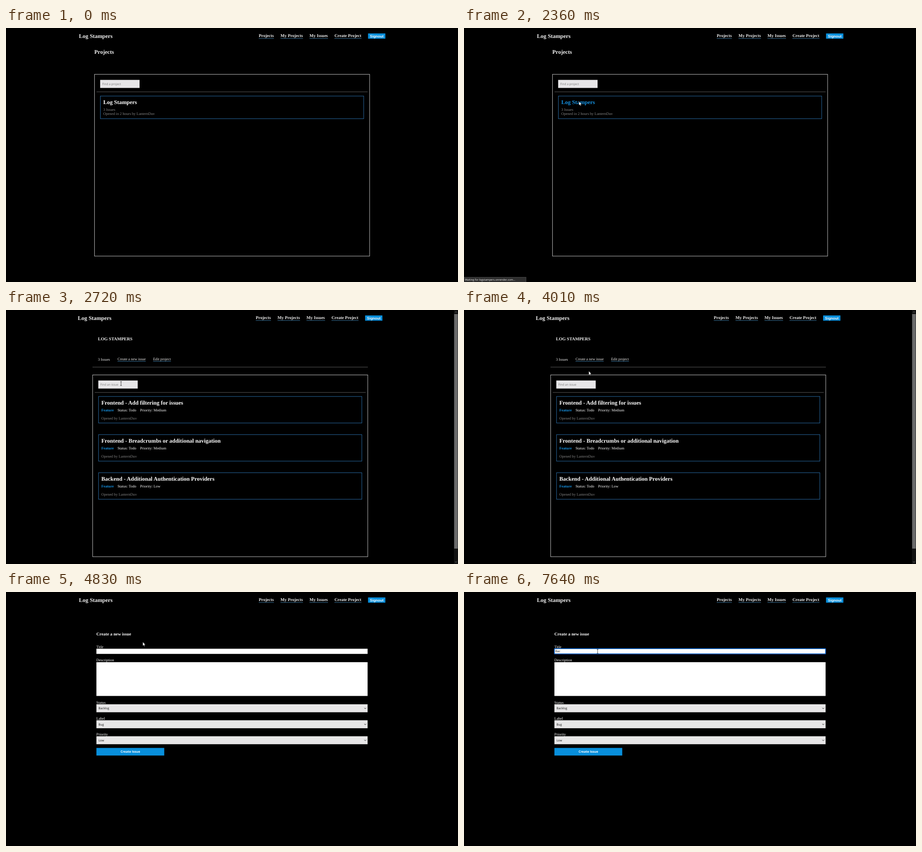
An HTML page for the animation above (8 s loop, 998 px wide and 561 px high).

```html
<!DOCTYPE html>
<html lang="en">
<head>
<meta charset="utf-8">
<title>Issue tracker walkthrough</title>
<style>
  html, body { margin: 0; width: 100%; height: 100%; overflow: hidden; background: #000; }
  svg { display: block; width: 998px; height: 561px; }
  text { font: 8.32px "Liberation Serif", serif; fill: #fff; white-space: pre; text-rendering: geometricPrecision; }
  .h1 { font-size: 12.48px; font-weight: bold; }
  .h2 { font-size: 9.73px; font-weight: bold; }
  .nav { font-size: 9.56px; font-weight: bold; }
  .soft { fill: #f0f0f0; }
  .gray { fill: #858585; }
  .label { fill: #1590df; font-weight: bold; }
  .ui { font: 6.55px "Open Sans", sans-serif; fill: #111; }
  .hint { fill: #777; }
  .signout { font: bold 8.1px "Liberation Sans", sans-serif; }
  .submit { font: bold 7.05px "Open Sans", sans-serif; text-anchor: middle; }
  .status { font: 5.9px "Open Sans", sans-serif; fill: #f4f4f4; }
  .box { fill: none; stroke: #c4c4c4; }
  .card { fill: none; stroke: #2a6ca6; }
  .chevron { fill: none; stroke: #222; }
</style>
</head>
<body>
<svg id="stage" viewBox="0 0 998 561"></svg>
<script>
const LOOP = 8000, STEP = 90;
const TEAM = "Log Stampers", AUTHOR = "LanternDuv", HOST = "logstampers.onrender.com";
const BLUE = "#088fdc", LINK = "#3d779f";

const text = (x, y, str, cls = "", id = "") =>
  `<text x="${x}" y="${y}" class="${cls}" id="${id}">${str}</text>`;
const fill = (x, y, w, h, color, extra = "") =>
  `<rect x="${x}" y="${y}" width="${w}" height="${h}" fill="${color}" ${extra}/>`;
const frame = (x, y, w, h, cls) =>
  `<rect x="${x}" y="${y}" width="${w}" height="${h}" class="${cls}"/>`;
const rule = (x, y, w, color = "#5c5c5c", id = "") => fill(x, y, w, 1, color, `id="${id}"`);

function header(left, right) {
  const links = [["Projects", 558, 33.5], ["My Projects", 606, 49.7],
    ["My Issues", 670, 41], ["Create Project", 725.2, 59.7]];
  return text(161 + left, 22, TEAM, "h1 soft") +
    links.map(([name, x, w]) =>
      text(x + right, 20.4, name, "nav soft") + rule(x + right, 22.6, w, LINK)).join("") +
    fill(799.4 + right, 12, 38.2, 11.6, BLUE) + text(803.5 + right, 20.8, "Signout", "signout");
}

function searchBox(x, y, hint) {
  return frame(x, y, 607.5, 401.5, "box") +
    fill(x + 12.5, y + 12.3, 87, 17.8, "#e7e6e8") +
    text(x + 17, y + 24, hint, "ui hint") + rule(x + 4.5, y + 38.2, 598.5);
}

function projectsPage() {
  return header(0, 0) + text(195, 57, "Projects", "h1 soft") +
    searchBox(195.4, 102.3, "Find a project") +
    frame(208.4, 150.3, 581.4, 50, "card") +
    text(214.7, 168, TEAM, "h1", "project") +
    text(214.7, 182.6, "3 Issues", "gray") +
    text(214.7, 191.8, `Opened in 2 hours by ${AUTHOR}`, "gray");
}

function issueCard(title, priority, i) {
  const y = 191 + i * 84.2;
  return frame(204.3, y, 581.4, 58.6, "card") +
    text(210.4, y + 18, title, "h1") +
    text(210.4, y + 33, "Feature", "label") +
    text(246.2, y + 33, "Status: Todo") +
    text(296, y + 33, `Priority: ${priority}`) +
    text(210.4, y + 50.8, `Opened by ${AUTHOR}`, "gray");
}

function issuesPage() {
  const issues = [["Frontend - Add filtering for issues", "Medium"],
    ["Frontend - Breadcrumbs or additional navigation", "Medium"],
    ["Backend - Additional Authentication Providers", "Low"]];
  return header(-2.5, -6.5) +
    text(203, 66.6, TEAM.toUpperCase(), "h2 soft") +
    text(203, 112, "3 Issues", "soft") +
    text(246.3, 111.3, "Create a new issue", "soft") + rule(246.3, 112.8, 62.2, LINK, "createLine") +
    text(324.8, 111.3, "Edit project", "soft") + rule(324.8, 112.8, 39.4, LINK) +
    rule(191, 125.6, 608) + searchBox(191.3, 143.4, "Find an issue") +
    issues.map(([title, priority], i) => issueCard(title, priority, i)).join("") +
    fill(989, 0, 9, 561, "#121212") + fill(989.5, 9, 8, 518, "#6a6a6a") +
    `<path d="M991.5 5.5l2-2 2 2M991.5 555.5l2 2 2-2" fill="none" stroke="#777"/>`;
}

function select(name, value, i) {
  const y = 248 + i * 35.3;
  return text(199.6, y - 1.4, name) + fill(199.6, y, 598.8, 17.6, "#e7e6e7") +
    text(204.2, y + 11.2, value, "ui") +
    `<path class="chevron" d="M791 ${y + 7.8}l2.2 2.2 2.2-2.2"/>`;
}

function formPage() {
  return header(0, 0) + text(199.6, 95.6, "Create a new issue", "h2") +
    text(199.6, 123.8, "Title") + fill(199.6, 125.3, 598.8, 11.4, "#fff") +
    `<rect id="focus" x="199.6" y="125.1" width="598.8" height="11.6" rx=".8" fill="none" stroke="#0a5fc4" stroke-width="1.8"/>` +
    text(201.7, 133.4, "", "ui", "typed") + fill(0, 127, 0.8, 8, "#111", `id="caret"`) +
    text(199.6, 153, "Description") + fill(199.6, 155, 598.8, 74.6, "#fff") +
    select("Status", "Backlog", 0) + select("Label", "Bug", 1) + select("Priority", "Low", 2) +
    fill(199.6, 344.4, 149.8, 16.8, BLUE) + text(274.5, 355.4, "Create Issue", "submit");
}

document.getElementById("stage").innerHTML = fill(0, 0, 998, 561, "#000") +
  [projectsPage, issuesPage, formPage].map((page, i) => `<g id="page${i}">${page()}</g>`).join("") +
  `<g id="statusBar">${fill(-1, 550.5, 0, 12, "#2e2e2e", `id="statusBox" stroke="#5a5a5a" stroke-width=".7"`)}
   ${text(2, 558.3, "", "status", "statusText")}</g>
   <path id="arrow" d="M0 0V8.4L1.9 6.6 3.2 9.5 4.5 8.9 3.2 6.1H5.8z" fill="#fff" stroke="#000" stroke-width=".4"/>
   <path id="beam" d="M-1.8-4.3H1.8M-1.8 4.3H1.8M0-4.3V4.3" fill="none" stroke="#333" stroke-width=".9"/>`;

const el = id => document.getElementById(id);
const show = (id, on) => el(id).setAttribute("visibility", on ? "inherit" : "hidden");

const linear = u => u;
const smooth = u => u * u * (3 - 2 * u);
const glide = u => 1 - (1 - u) ** 2.77;
// start time, number of steps, target x and y, easing per axis
const moves = [
  [740, 9, 338, 114, glide, linear],
  [1550, 7, 254, 162.5, smooth, smooth],
  [3370, 2, 249, 159.5, linear, linear],
  [3830, 6, 302, 110.5, smooth, smooth],
  [5100, 5, 297, 132.5, smooth, smooth],
  [5730, 2, 295, 131, linear, linear],
];

function pointer(t) {
  let x = 1112, y = 155.6;
  for (const [start, steps, toX, toY, easeX, easeY] of moves) {
    if (t < start) break;
    const u = Math.min(1, (Math.floor((t - start) / STEP) + 1) / steps);
    x += (toX - x) * easeX(u);
    y += (toY - y) * easeY(u);
  }
  return [x, y];
}

function statusFor(t, overProject, overCreate) {
  const waiting = `Waiting for ${HOST}...`, transfer = `Transferring data from ${HOST}...`;
  if (overProject) {
    if (t >= 2450) return [transfer, 148.5];
    return [t >= 2270 ? waiting : `https://${HOST}/projects/4821`, 137];
  }
  if (overCreate) {
    if (t >= 4740) return [transfer, 148.5];
    return [t >= 4650 ? waiting : `https://${HOST}/projects/4821/new`, 148.5];
  }
  return ["", 0];
}

function render(t) {
  const page = t < 2540 ? 0 : t < 4830 ? 1 : 2;
  for (let i = 0; i < 3; i++) show("page" + i, i === page);

  const [x, y] = pointer(t);
  const overProject = page === 0 && x < 291 && y > 156;
  const overCreate = page === 1 && x < 309 && y < 115;
  const overField = page === 1 ? y > 156 : page === 2 && y > 125;
  show("arrow", t >= 740 && !overField);
  show("beam", overField);
  for (const id of ["arrow", "beam"]) el(id).setAttribute("transform", `translate(${x} ${y})`);

  el("project").style.fill = overProject ? "#1590df" : "#fff";
  el("createLine").setAttribute("fill", overCreate ? "#fff" : LINK);

  const [message, width] = statusFor(t, overProject, overCreate);
  show("statusBar", message !== "");
  el("statusText").textContent = message;
  el("statusBox").setAttribute("width", width + 1);

  const typed = [7100, 7280, 7460].filter(time => t >= time).length;
  const caretOn = t >= 5460 && t < 6000 || t >= 6550 && t < 7640;
  el("typed").textContent = "Bac".slice(0, typed);
  el("caret").setAttribute("x", [201.2, 205.4, 209.2, 212.2][typed]);
  show("focus", page === 2 && t >= 5460);
  show("caret", page === 2 && caretOn);
}

function tick() {
  render(performance.now() % LOOP);
  requestAnimationFrame(tick);
}
tick();
</script>
</body>
</html>
```
